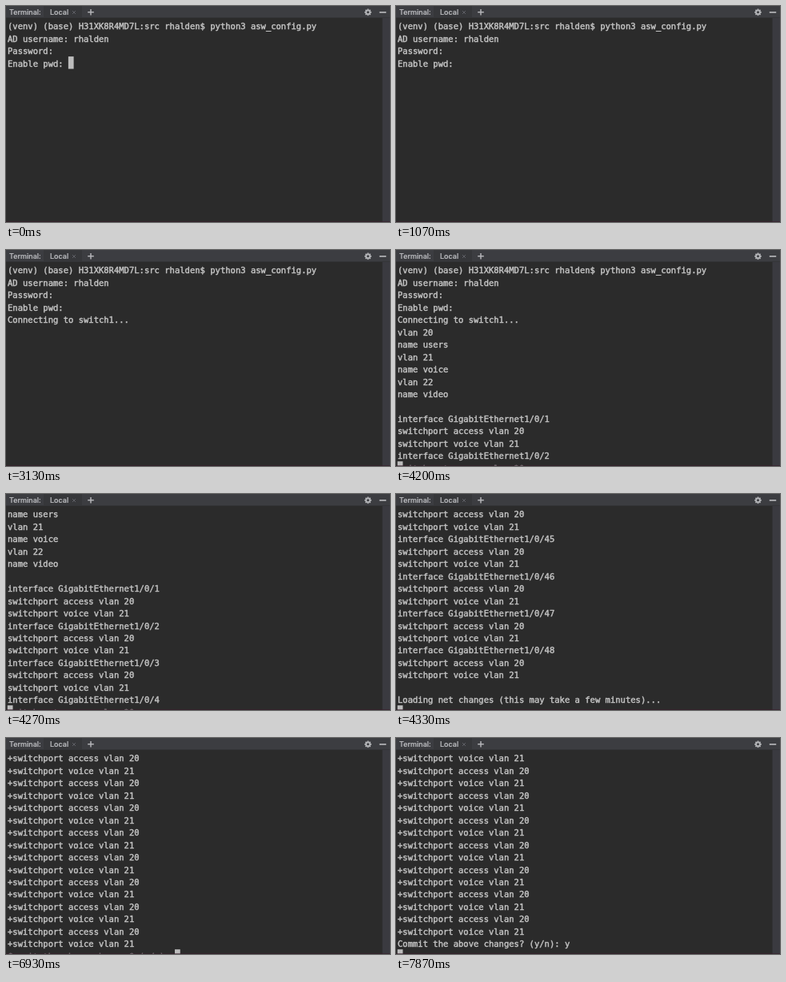
An HTML page with a canvas for the animation above (8000 ms loop, 480 by 270 pixels).

```html
<!DOCTYPE html>
<html lang="en">
<head>
<meta charset="utf-8">
<title>Terminal</title>
<style>
html, body { margin: 0; width: 100%; height: 100%; overflow: hidden; background: #2b2b2b; }
canvas { display: block; width: 480px; height: 270px; }
</style>
</head>
<body>
<canvas id="stage" width="480" height="270"></canvas>
<script>
const ctx = document.getElementById('stage').getContext('2d');
const LOOP = 8000;
const CELL = 6.34, PITCH = 15.47, LEFT = 2, TOP = 16.7, BASE = 29.3;
const MONO = '10.53px "DejaVu Sans Mono", monospace';
const UI = '500 9px Inter, sans-serif';
const BAR = '#3c3d41', ICON = '#b4b5b8';

const access = 'switchport access vlan 20';
const voice = 'switchport voice vlan 21';
const login = [
  '(venv) (base) H31XK8R4MD7L:src rhalden$ python3 asw_config.py',
  'AD username: rhalden',
  'Password:',
  'Enable pwd: '
];
const connecting = [...login, 'Connecting to switch1...'];
const config = ['vlan 20', 'name users', 'vlan 21', 'name voice', 'vlan 22', 'name video', ''];
for (let port = 1; port <= 48; port++) {
  config.push('interface GigabitEthernet1/0/' + port, access, voice);
}
const loading = [...config, '', 'Loading net changes (this may take a few minutes)...'];
const diff = Array.from({ length: 48 }, (_, i) => '+' + (i % 2 ? voice : access));
const prompt = [...diff, 'Commit the above changes? (y/n): '];
const answer = [...diff, 'Commit the above changes? (y/n): y'];

const tail = (lines, count) => lines.slice(-count);

// start time, visible lines, cursor row and column, times at which the cursor toggles
const scenes = [
  { at: 0, lines: login, row: 3, col: 12, blink: [70, 530, 1070, 1530] },
  { at: 1600, lines: connecting, row: 5, col: 0, blink: [2070, 2600, 3130, 3730] },
  { at: 4200, lines: [...connecting, ...config.slice(0, 12)], row: 16, col: 0, blink: [] },
  { at: 4270, lines: config.slice(1, 18), row: 16, col: 0, blink: [] },
  { at: 4330, lines: tail(loading, 16), row: 16, col: 0, blink: [5330, 6070, 6600] },
  { at: 6930, lines: tail(prompt, 17), row: 16, col: 33, blink: [7130] },
  { at: 7470, lines: tail(answer, 17), row: 16, col: 34, blink: [] },
  { at: 7870, lines: tail(answer, 16), row: 16, col: 0, blink: [] }
];

function rect(x, y, w, h, color) {
  ctx.fillStyle = color;
  ctx.fillRect(x, y, w, h);
}

function line(x1, y1, x2, y2, color, width) {
  ctx.strokeStyle = color;
  ctx.lineWidth = width;
  ctx.beginPath();
  ctx.moveTo(x1, y1);
  ctx.lineTo(x2, y2);
  ctx.stroke();
}

function disc(x, y, r, color) {
  ctx.fillStyle = color;
  ctx.beginPath();
  ctx.arc(x, y, r, 0, 2 * Math.PI);
  ctx.fill();
}

// a thin outline gives the text its heavier, softer weight
function label(text, x, y, font, color, outline) {
  ctx.font = font;
  ctx.fillStyle = ctx.strokeStyle = color;
  ctx.lineWidth = outline;
  ctx.lineJoin = 'round';
  ctx.fillText(text, x, y);
  ctx.strokeText(text, x, y);
}

function gear(x, y) {
  for (let i = 0; i < 4; i++) {
    const a = i * Math.PI / 4, dx = 4.3 * Math.cos(a), dy = 4.3 * Math.sin(a);
    line(x - dx, y - dy, x + dx, y + dy, ICON, 1.7);
  }
  disc(x, y, 3.3, ICON);
  disc(x, y, 1.5, BAR);
}

function drawHeader() {
  rect(0, 0, 480, 14, BAR);
  rect(0, 14, 480, 1, '#343538');
  rect(47, 0, 48, 14, '#36373a');
  label('Terminal:', 4, 11, UI, '#bcbdc0', 0.2);
  label('Local', 55, 11, UI, '#bcbdc0', 0.2);
  line(83, 6, 87, 10, '#65666a', 0.9);
  line(87, 6, 83, 10, '#65666a', 0.9);
  line(102.2, 7.7, 109.8, 7.7, ICON, 1.5);
  line(106, 3.9, 106, 11.5, ICON, 1.5);
  gear(452.5, 7.8);
  line(466.8, 7.9, 475.2, 7.9, ICON, 1.7);
}

function draw(t) {
  const scene = scenes.findLast(s => t >= s.at);
  const lit = scene.blink.filter(b => t >= b).length % 2 === 0;
  rect(0, 0, 480, 270, '#2b2b2b');
  rect(470.5, 15, 9.5, 255, '#3a3a40');
  scene.lines.forEach((text, i) => label(text, LEFT, BASE + i * PITCH, MONO, '#c4c4c4', 0.45));
  if (lit) rect(LEFT - 0.2 + scene.col * CELL, TOP + scene.row * PITCH, CELL + 0.4, PITCH, '#bdbdbd');
  rect(0, 269, 480, 1, 'rgba(58, 28, 42, 0.6)');
  drawHeader();
}

function tick() {
  draw(performance.now() % LOOP);
  requestAnimationFrame(tick);
}
tick();
</script>
</body>
</html>
```
